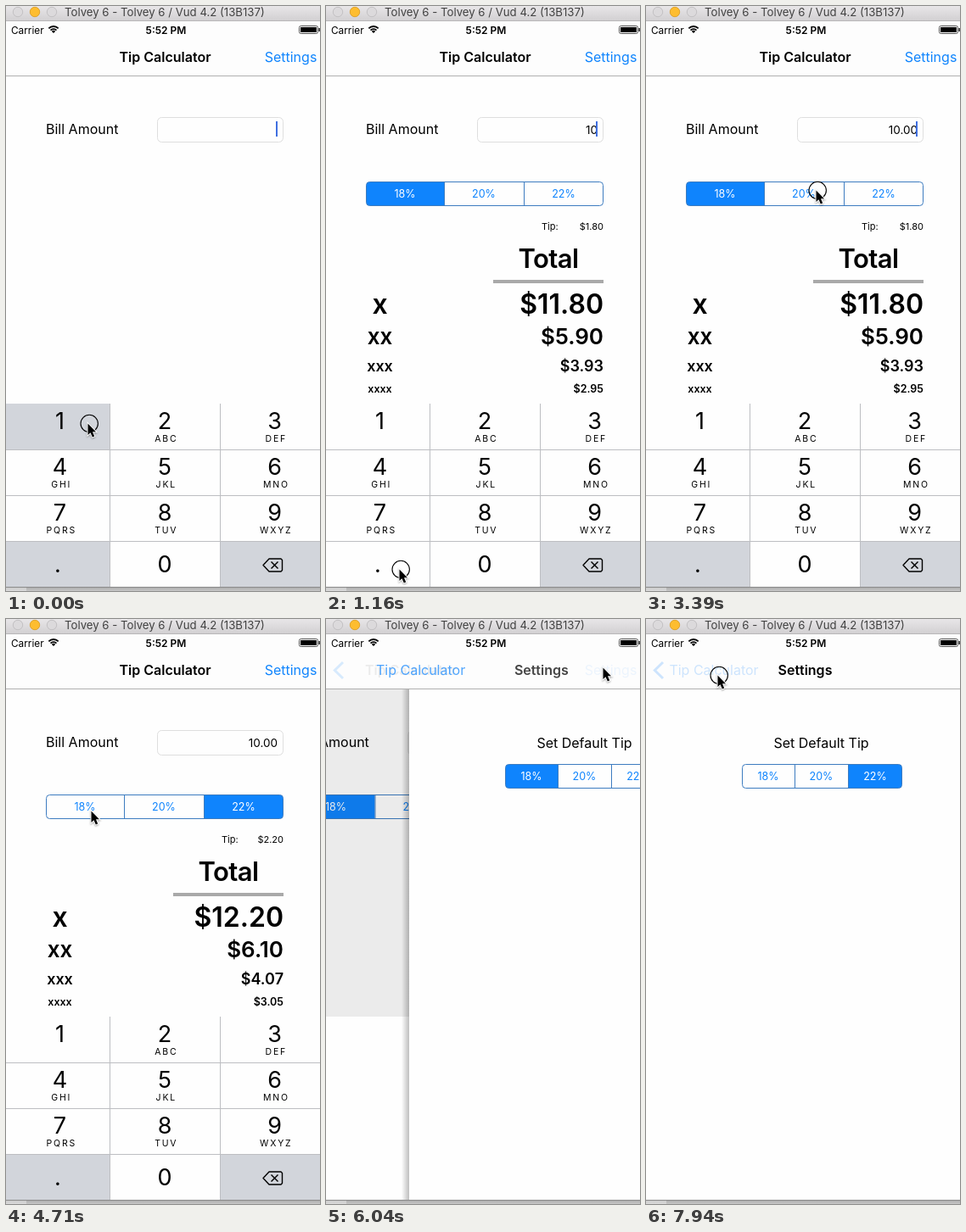
An HTML page with a canvas for the animation above (8 s loop, 370 by 690 pixels).

```html
<!DOCTYPE html>
<html lang="en">
<head>
<meta charset="utf-8">
<title>Tip Calculator</title>
<style>
  html, body { margin: 0; width: 100%; height: 100%; overflow: hidden; background: #fefefe; }
  canvas { display: block; }
</style>
</head>
<body>
<canvas id="stage" width="370" height="690"></canvas>
<script>
const ctx = document.getElementById('stage').getContext('2d');
const LOOP = 8000, W = 370;
const BLUE = '#0f84fd', WHITE = '#fefefe', KEY_GRAY = '#d2d5db', LINE = '#bdbec2';
const PUSH_START = 5898;

// Pointer moves: start, end, target x, target y
const MOVES = [
  [200, 600, 190, 655], [880, 1040, 86, 664], [1500, 1800, 194, 658],
  [2300, 2800, 200, 217], [3560, 3950, 280, 221], [4300, 4680, 100, 226],
  [5050, 5450, 326, 57], [6290, 6770, 274, 193], [7250, 7750, 84, 66]
];
// Presses: start, end, what is pressed
const PRESSES = [
  [0, 150, '1'], [700, 860, '0'], [1040, 1300, '.'], [1880, 2020, '0'], [2150, 2290, '0'],
  [3250, 3530], [4000, 4200], [4800, 4950], [5560, 5840, 'settings'],
  [7000, 7180], [7830, 8000, 'back']
];
const TIP_CHOICES = [[0, 0], [3530, 1], [4200, 2], [4950, 0]];
const DEFAULT_CHOICES = [[0, 0], [6980, 2]];
const RATES = [18, 20, 22];
const KEYS = ['1', '2ABC', '3DEF', '4GHI', '5JKL', '6MNO', '7PQRS', '8TUV', '9WXYZ', '.', '0', ''];

const clamp = v => Math.max(0, Math.min(1, v));
const money = v => '$' + v.toFixed(2);
const pressAt = t => PRESSES.find(([a, b]) => t >= a && t < b);

function withAlpha(alpha, draw) {
  ctx.save();
  ctx.globalAlpha *= alpha;
  draw();
  ctx.restore();
}

function shifted(x, y, draw) {
  ctx.save();
  ctx.translate(x, y);
  draw();
  ctx.restore();
}

function rect(x, y, w, h, color) {
  ctx.fillStyle = color;
  ctx.fillRect(x, y, w, h);
}

function label(str, x, y, size, { align = 'center', weight = 400, color = '#000', spacing = 0 } = {}) {
  ctx.font = `${weight} ${size}px Inter, sans-serif`;
  ctx.letterSpacing = spacing + 'px';
  ctx.textAlign = align;
  ctx.fillStyle = color;
  ctx.fillText(str, x, y);
}

function poly(points, close) {
  ctx.beginPath();
  points.forEach(([x, y]) => ctx.lineTo(x, y));
  if (close) ctx.closePath();
}

function stroke(color, width) {
  ctx.strokeStyle = color;
  ctx.lineWidth = width;
  ctx.stroke();
}

function circle(x, y, r) {
  ctx.beginPath();
  ctx.arc(x, y, r, 0, 7);
}

function roundRect(x, y, w, h, r) {
  ctx.beginPath();
  ctx.roundRect(x, y, w, h, r);
}

// Three segments between four edges; a change of choice cross-fades
function segments(edges, y, choices, t) {
  const past = choices.filter(c => c[0] <= t);
  const [since, now] = past[past.length - 1];
  const before = past.length > 1 ? past[past.length - 2][1] : now;
  const fade = clamp((t - since) / 160);
  const outline = () => roundRect(edges[0] + .5, y + .5, edges[3] - edges[0] - 1, 28, 4);
  RATES.forEach((rate, i) => {
    const on = now === before ? +(i === now) : i === now ? fade : i === before ? 1 - fade : 0;
    const left = edges[i], width = edges[i + 1] - left, mid = left + width / 2;
    ctx.save();
    outline();
    ctx.clip();
    withAlpha(on, () => rect(left, y, width, 29, BLUE));
    ctx.restore();
    withAlpha(1 - on, () => label(rate + '%', mid, y + 19, 12.5, { color: BLUE }));
    withAlpha(on, () => label(rate + '%', mid, y + 19, 12.5, { color: '#fff' }));
    if (i) rect(left, y, 1, 29, '#3d7cc0');
  });
  outline();
  stroke('#3d7cc0', 1);
}

function calculator(t) {
  const typed = PRESSES.filter(p => p[1] <= t && /^[\d.]$/.test(p[2])).map(p => p[2]).join('');
  const caretOn = t < 2700 || (t - 2700) % 1000 >= 400;
  label('Bill Amount', 47, 151, 16, { align: 'left' });
  roundRect(178.5, 131.5, 148, 29, 5);
  stroke('#dedede', 1);
  label(typed, 320, 151, 13.5, { align: 'right' });
  if (caretOn) rect(318, 136, 2, 18, '#3f6fe0');

  const rate = RATES[TIP_CHOICES.filter(c => c[0] <= t).pop()[1]];
  const tip = typed * rate / 100, total = +typed + tip;
  withAlpha(clamp((t - 150) / 250), () => {
    segments([47, 139, 233, 327], 207, TIP_CHOICES, t);
    label('Tip:', 254, 263.5, 11, { align: 'left' });
    label(money(tip), 327, 263.5, 11, { align: 'right' });
    label('Total', 262, 309, 31, { weight: 600, spacing: -.6 });
    rect(197, 323, 130, 4, '#a9a9a9');
    [[32, 363], [26, 399], [18, 430.5], [12.5, 456]].forEach(([size, y], i) => {
      label('x'.repeat(i + 1), 63.5, y, size, { weight: 600 });
      label(money(total / (i + 1)), 327, y, size, { weight: 600, align: 'right' });
    });
  });
}

function backspaceIcon() {
  ctx.lineJoin = 'round';
  poly([[303, 659.5], [310, 652], [324, 652], [325.5, 653.5], [325.5, 665.5], [324, 667], [310, 667]], true);
  stroke('#000', 1.4);
  for (const d of [-1, 1]) {
    poly([[312.5, 659.5 - 4 * d], [320.5, 659.5 + 4 * d]]);
    stroke('#000', 1.4);
  }
}

function keyboard(pressed) {
  const edges = [0, 122, 252, 370], mids = [63.5, 187, 316.5];
  rect(0, 469, W, 216, WHITE);
  KEYS.forEach((key, i) => {
    const col = i % 3, y = 469 + 54 * Math.floor(i / 3);
    const gray = (i === 9 || i === 11) !== (key !== '' && key[0] === pressed);
    rect(edges[col], y, edges[col + 1] - edges[col], 54, gray ? KEY_GRAY : WHITE);
    label(key.slice(0, 1), i === 9 ? 61 : mids[col], y + (i > 8 ? 37 : 30), 27);
    label(key.slice(1), mids[col] + 1.8, y + 45, 10.5, { spacing: 1.8 });
  });
  [523, 577, 631].forEach(y => rect(0, y, W, 1, LINE));
  edges.slice(1, 3).forEach(x => rect(x, 469, 1, 216, LINE));
  backspaceIcon();
}

function settings(t) {
  rect(0, 83, W, 602, WHITE);
  const shade = ctx.createLinearGradient(-9, 0, 0, 0);
  shade.addColorStop(0, 'rgba(0,0,0,0)');
  shade.addColorStop(1, 'rgba(0,0,0,.25)');
  rect(-9, 83, 9, 602, shade);
  label('Set Default Tip', 206.5, 152, 16);
  segments([113, 175, 238, 302], 171, DEFAULT_CHOICES, t);
}

function navBar(p, pressed) {
  const title = { weight: 600 }, link = { color: BLUE }, y = 66;
  rect(0, 18, W, 65, '#fdfdfd');
  rect(0, 82, W, 1, '#b0b0b0');
  withAlpha((1 - p) ** 2, () => {
    label('Tip Calculator', 187.5 - 119 * p, y, 16, title);
    withAlpha(pressed === 'settings' ? .2 : 1, () => label('Settings', 335.5, y, 16, link));
  });
  withAlpha(pressed === 'back' ? .2 : 1, () => {
    withAlpha(p, () => label('Tip Calculator', 80 + 119 * (1 - p), y, 16, link));
    withAlpha(p ** 6, () => {
      ctx.lineJoin = 'miter';
      poly([[20, 51], [10.3, 60.5], [20, 70]]);
      stroke(BLUE, 3);
    });
  });
  withAlpha(p, () => label('Settings', 187.5 + 250 * (1 - p), y, 16, title));
}

function statusBar() {
  label('Carrier', 6, 32.5, 11.8, { align: 'left' });
  label('5:52 PM', 188.5, 32.5, 12, { weight: 600 });
  for (const r of [8, 4.9, 1.6]) {
    ctx.beginPath();
    ctx.arc(56, 32, r, -Math.PI * .75, -Math.PI * .25);
    stroke('#000', r < 2 ? 3 : 1.8);
  }
  roundRect(345.5, 23.5, 22, 9, 2);
  stroke('#555', 1);
  rect(347, 25, 19, 6, '#000');
  rect(368.5, 26, 1.5, 4, '#333');
}

function windowFrame() {
  const bar = ctx.createLinearGradient(0, 0, 0, 17);
  bar.addColorStop(0, '#e8e6e8');
  bar.addColorStop(1, '#d2d0d2');
  rect(0, 0, W, 17, bar);
  rect(0, 17, W, 1, '#b8b6b8');
  ['#dcdadc', '#fdbd2f', '#dcdadc'].forEach((color, i) => {
    circle(14 + 20 * i, 7, 5.7);
    ctx.fillStyle = color;
    ctx.fill();
    stroke(i === 1 ? '#dfa32c' : '#c3c1c3', 1);
  });
  label('Tolvey 6 - Tolvey 6 / Vud 4.2 (13B137)', 69, 12, 13.2, { align: 'left', color: '#414141' });

  const base = ctx.createLinearGradient(0, 685, 0, 690);
  base.addColorStop(0, '#a6a6a6');
  base.addColorStop(1, '#c8c8c8');
  rect(0, 685, W, 5, base);
  rect(0, 686, 24, 4, 'rgba(255,255,255,.35)');
  rect(0, 685, W, 1, '#8c8c8c');
}

function pointer(t, pressing) {
  let x = 96, y = 492;
  for (const [start, end, tx, ty] of MOVES) {
    const k = 1 - (1 - clamp((t - start) / (end - start))) ** 2.5;
    x += (tx - x) * k;
    y += (ty - y) * k;
  }
  if (pressing) {
    circle(x + 2.2, y + .5, 10.2);
    stroke('#000', 1.1);
  }
  shifted(x, y, () => {
    ctx.lineJoin = 'miter';
    poly([[.5, .5], [.5, 14], [3.5, 11.2], [5.8, 16.5], [8.2, 15.5], [6, 10.3], [10, 10.3]], true);
    ctx.shadowColor = 'rgba(0,0,0,.35)';
    ctx.shadowBlur = 2;
    ctx.shadowOffsetY = 1;
    stroke('#fff', 2);
    ctx.shadowColor = 'transparent';
    ctx.fillStyle = '#000';
    ctx.fill();
  });
}

function render(t) {
  const press = pressAt(t), pressed = press && press[2];
  // Critically damped spring for the screen push
  const s = Math.max(0, t - PUSH_START) * .01826;
  const p = s > 10 ? 1 : 1 - (1 + s) * Math.exp(-s);

  rect(0, 0, W, 690, WHITE);
  if (p < 1) {
    shifted(-.3 * W * p, 0, () => calculator(t));
    rect(0, 83, W, 386, `rgba(0,0,0,${.1 * p})`);
    shifted(-W * Math.min(1, 1.4 * p), 0, () => keyboard(pressed));
  }
  if (p > 0) shifted(Math.round(W * (1 - p)), 0, () => settings(t));
  navBar(p, pressed);
  statusBar();
  windowFrame();
  pointer(t, press);
}

function tick() {
  render(performance.now() % LOOP);
  requestAnimationFrame(tick);
}
tick();
</script>
</body>
</html>
```
